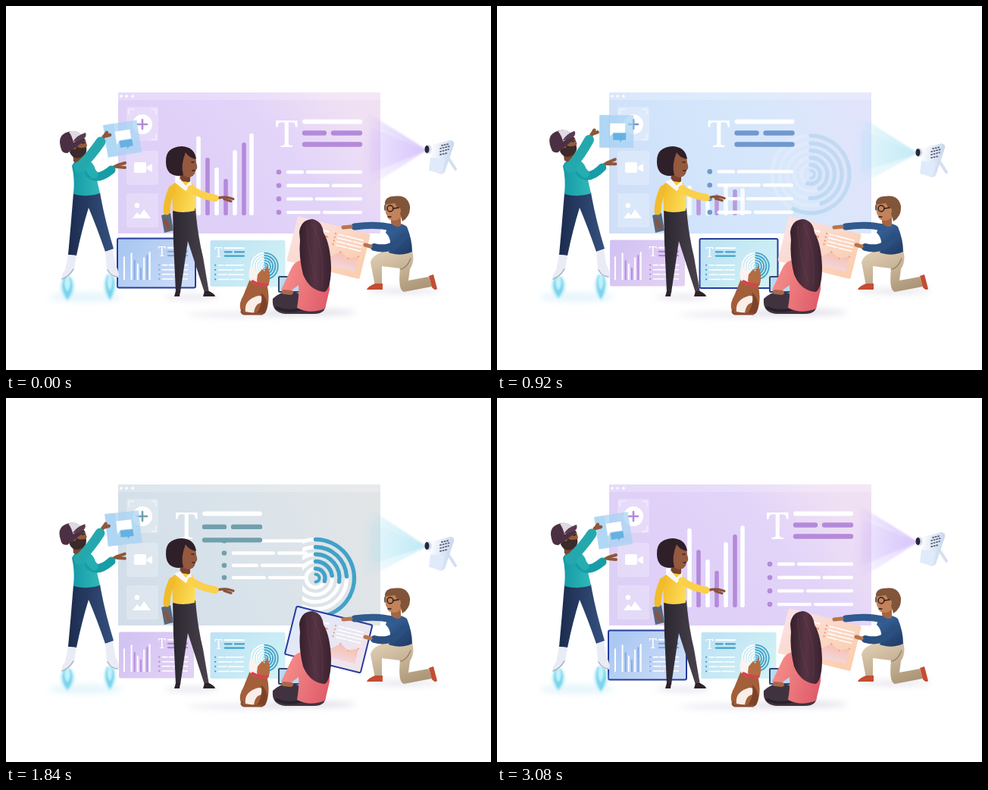
An HTML page that plays this animation: 640 px wide and 480 px high, repeating every 3.12 s.

```html
<!DOCTYPE html>
<html lang="en">
<head>
<meta charset="utf-8">
<title>Presentation team</title>
<style>
html, body { margin: 0; width: 100%; height: 100%; overflow: hidden; background: #fff; }
svg { display: block; width: 100vw; height: 100vh; }
text { font-family: "Noto Serif", "Liberation Serif", serif; font-size: 50px; }
</style>
</head>
<body>
<svg id="stage" viewBox="0 0 640 480"></svg>
<script>
const LOOP = 3120;
const SCENES = {
  bars:  { tx: 356, gapY: 15, dx: 360, y0: 219, row: 17.7, accent: [180, 138, 218], beam: '#c3a8fa', spread: 45 },
  rings: { tx: 224, gapY: 15, dx: 225, y0: 218, row: 18, accent: [66, 162, 200], beam: '#b4cdfb', spread: 42 },
  area:  { tx: 224, gapY: 20.3, dx: 363, y0: 153, row: 14, accent: [245, 154, 98], beam: '#ffc9a2', spread: 30 }
};
const MOVES = [
  { from: 'bars', to: 'rings', start: 720, span: 360 },
  { from: 'rings', to: 'area', start: 1670, span: 360 },
  { from: 'area', to: 'bars', start: 2640, span: 360 }
];
const BARS = [[226, 186, 181], [254, 172, 182], [266, 200, 220], [278, 213, 210],
  [290, 228, 207], [302, 190, 179], [314, 180, 194], [324, 168, 191]];
const PEAKS = [[295, 260], [329, 240], [364, 245], [398, 216], [433, 234], [469, 217]];
// Card looks: plain fill, lit fill, plain accent, lit accent.
const CARDS = {
  bars: ['purpleCard', 'blueCard', '#b48ada', '#86a8e4'],
  rings: ['cyanCard', 'cyanCard', '#42a2c8', '#42a2c8'],
  area: ['peachCard', 'paleCard', '#f59a62', '#f0a27c']
};

const clamp = v => Math.max(0, Math.min(1, v));
const lerp = (a, b, k) => a + (b - a) * k;
const ease = k => (1 - Math.cos(Math.PI * clamp(k))) / 2;
const wave = (t, period) => (1 - Math.cos(2 * Math.PI * t / period)) / 2;
const rgb = c => `rgb(${c.map(Math.round)})`;
const shape = (d, fill, extra = '') => `<path d="${d}" fill="${fill}" ${extra}/>`;
const line = (d, color, width, extra = '') =>
  `<path d="${d}" fill="none" stroke="${color}" stroke-width="${width}" stroke-linecap="round" stroke-linejoin="round" ${extra}/>`;
const oval = (x, y, rx, ry, fill, extra = '') =>
  `<ellipse cx="${x}" cy="${y}" rx="${rx}" ry="${ry}" fill="${fill}" ${extra}/>`;
const box = (x, y, w, h, fill, extra = '') =>
  `<rect x="${x}" y="${y}" width="${w}" height="${h}" fill="${fill}" ${extra}/>`;
const group = (body, extra) => `<g ${extra}>${body}</g>`;
const grad = (id, angle, ...colors) =>
  `<linearGradient id="${id}" gradientTransform="rotate(${angle} .5 .5)">` +
  colors.map((c, i) => `<stop offset="${i / (colors.length - 1)}" stop-color="${c}"/>`).join('') +
  '</linearGradient>';

function blend(a, b, p) {
  const out = {}, tint = ease((p - .25) / .6);
  for (const key of ['tx', 'gapY', 'dx', 'y0', 'row']) out[key] = lerp(a[key], b[key], p);
  out.accent = a.accent.map((c, i) => lerp(c, b.accent[i], tint));
  return out;
}

function copy(l, color) {
  const x = l.tx + 38, y = 152.5;
  let s = '';
  [24, 58, 36, 46].forEach((cut, i) => {
    const ry = l.y0 + i * l.row;
    s += oval(l.dx, ry, 3.3, 3.3, color);
    s += line(`M${l.dx + 12} ${ry}H${l.dx + cut + 7}M${l.dx + cut + 14} ${ry}H${l.dx + 108}`, '#fff', 4.4);
  });
  s += `<text x="${l.tx - 1}" y="186" fill="#fff">T</text>`;
  s += line(`M${x} ${y}h73`, '#fff', 6);
  return s + line(`M${x} ${y + l.gapY}h26M${x + 38} ${y + l.gapY}h35M${x} ${y + 2 * l.gapY}h73`, color, 6.4);
}

function bars(color, u, grow) {
  return BARS.map(([x, a, b], i) => {
    const h = (276 - lerp(a, b, u)) * grow;
    const fill = i && i % 2 === 0 ? color : '#fff';
    return box(x - 2.8, 276 - h, 5.6, h, fill, 'rx="2.6"');
  }).join('');
}

function rings(color, p = 0) {
  let s = '';
  [[51, 207], [41, 160], [31.5, 182], [22, 150], [12.5, 200]].forEach(([r, full], i) => {
    const sweep = i ? full * (1 - p) : full, a = sweep * Math.PI / 180;
    s += `<circle cx="414" cy="222" r="${r}" fill="none" stroke="#fff" stroke-width="5"/>`;
    s += line(`M414 ${222 - r}A${r} ${r} 0 ${+(sweep > 180)} 1 ${414 + r * Math.sin(a)} ${222 - r * Math.cos(a)}`, color, 5.4);
  });
  s += line('M414 217a5 5 0 0 1 0 10', color, 4);
  if (!p) return s;
  return `<clipPath id="ringCut"><rect x="${360 + 80 * p}" y="160" width="200" height="140"/></clipPath>` +
    group(s, `transform="translate(${-12 * p} ${34 * p})" clip-path="url(#ringCut)"`);
}

function area(color, p = 0) {
  const top = PEAKS.map(q => q.join(' ')).join('L');
  const body = shape(`M255 276L262 268L${top}V276Z`, 'url(#areaFill)') +
    line(`M262 268L${top}`, '#f6bba0', 1, 'opacity=".6"');
  const drift = Math.min(1, p * 4);
  const dots = PEAKS.map(([x, y]) =>
    oval(x - drift * (11 + (x - 295) * .1), y + drift * (5 + (x - 295) * .085), 3, 3, color)).join('');
  if (!p) return body + dots;
  return `<clipPath id="areaCut"><rect x="${255 + 230 * p}" y="200" width="${Math.max(0, 216 - 410 * p)}" height="90"/></clipPath>` +
    group(body, `clip-path="url(#areaCut)" opacity="${1 - p}"`) + group(dots, `opacity="${1 - p}"`);
}

function chart(name, color, u, leave, enter) {
  const grow = clamp(enter * 2 - 1);
  const body = name === 'bars' ? bars(color, u, (1 - leave) * grow)
    : name === 'rings' ? rings(color, leave) : area(color, leave);
  return group(body, `opacity="${clamp((1 - leave) * 2) * grow}"`);
}

function thumb(name, place) {
  const mini = copy(SCENES[name], 'currentColor') + chart(name, 'currentColor', 0, 0, 1);
  return group(box(0, 0, 99, 61, `url(#${CARDS[name][0]})`, 'rx="2"') +
    box(-2, -2, 103, 65, `url(#${CARDS[name][1]})`, `rx="2" stroke="#263c9e" id="${name}Lit"`) +
    group(mini, `transform="scale(.345) translate(-206 -123)" id="${name}Mini"`), `transform="${place}"`);
}

function sidebar(color) {
  let s = '';
  for (const y of [133, 191, 247]) s += box(159, y, 42, 45, '#fff', 'opacity=".24" rx="2"');
  s += line('M162 143v-7h7M192 136h6v7M198 169v7h-6M169 176h-7v-7', '#fff', 1, 'opacity=".8"');
  s += oval(180, 156, 13, 13, '#fff') + line('M174 156h12M180 150v12', color, 2.6);
  s += box(169, 206, 16, 14, '#fff', 'rx="2"') + shape('M186 212l7-4v11l-7-4z', '#fff');
  s += oval(173, 263, 3.3, 3.3, '#fff') + shape('M167 280l6-8 4 4 5-8 9 12z', '#fff');
  return s;
}

function screen(move, p, u, lit) {
  const l = blend(SCENES[move.from], SCENES[move.to], p), color = rgb(l.accent);
  const pane = (fill, o) => box(148, 114, 346, 186, fill, `opacity="${o}"`);
  let s = pane(`url(#${move.from}Bg)`, 1) + pane(`url(#${move.to}Bg)`, lit);
  if (move.from === 'rings') s += pane('url(#mistBg)', .9 * Math.sin(Math.PI * p));
  s += box(148, 114, 346, 10, '#fff', 'opacity=".2"');
  for (const x of [152, 159, 167]) s += oval(x, 119, 1.8, 1.8, '#fff');
  s += sidebar(color);
  if (p < 1) s += chart(move.from, rgb(SCENES[move.from].accent), u, p, 1);
  if (p > .5) s += chart(move.to, rgb(SCENES[move.to].accent), u, 0, p);
  return s + copy(l, color);
}

function beam(move, p, lift) {
  const mid = Math.sqrt(Math.sin(Math.PI * clamp(p)));
  const { beam: color, spread } = SCENES[p < .5 ? move.from : move.to];
  const y = 190 + lift;
  const fan = (id, c, half, o) => {
    const ray = (x, a, b, k) => shape(`M556 ${y}L${x} ${190 + a}V${190 + b}Z`, `url(#${id})`, `opacity="${k}"`);
    return `<radialGradient id="${id}" gradientUnits="userSpaceOnUse" cx="556" cy="${y}" r="92">` +
      `<stop offset="0" stop-color="${c}"/><stop offset=".7" stop-color="${c}" stop-opacity=".45"/>` +
      `<stop offset="1" stop-color="${c}" stop-opacity="0"/></radialGradient>` +
      group(ray(470, -half * 1.2, half * 1.2, .45) + ray(480, -half * .7, half * .7, .4) +
        ray(466, -half * 1.25, -half * .9, .3), `opacity="${o}" filter="url(#soft)"`);
  };
  return fan('rayA', color, spread, 1 - mid) + fan('rayB', '#a3e0f2', 42, mid);
}

function flames(t) {
  const turn = 2 * Math.PI * t / LOOP;
  return [[81, 357, 0], [137, 354, 2]].map(([x, y, k]) => {
    const h = 30 + 3 * Math.sin(turn * 13 + k), w = 8.5 + Math.cos(turn * 17 + k);
    const drop = (a, b, c, o) => shape(`M${x - a * .5} ${y}C${x - a * 1.5} ${y + b * .45} ${x - a * .6} ${y + b * .8} ${x} ${y + b}C${x + a * .7} ${y + b * .8} ${x + a * 1.5} ${y + b * .4} ${x + a * .5} ${y}Z`, c, `opacity="${o}"`);
    return group(drop(w + 1, h + 3, '#a5e8f6', .45) + drop(w * .75, h, '#55c6e6', .7) + drop(w * .4, h * .65, '#c9f6ff', .9), 'filter="url(#soft)"');
  }).join('');
}

const defs = `<defs>
${grad('barsBg', -25, '#ddd0f6', '#e0d0f8', '#e2d4f9', '#f0e0f4')}
${grad('ringsBg', -12, '#cfdff8', '#d2e5fb', '#d8e7fb', '#e1e4fb')}
${grad('areaBg', -12, '#dfd2f6', '#e8daf7', '#f2dfef', '#fbe3dd')}
${grad('mistBg', -12, '#d0dfe8', '#d7e4e9', '#dfe5e8')}
${grad('areaFill', 90, '#f6c0b0', '#f3d5da')}
${grad('purpleCard', 25, '#d3c3f3', '#e3d1f4')}
${grad('blueCard', 25, '#abc8f2', '#ccdcf7')}
${grad('cyanCard', 25, '#bfe3f5', '#cff1f5')}
${grad('peachCard', 25, '#fbe0e0', '#fbcfb0')}
${grad('paleCard', 25, '#dfe9fb', '#f0e4ec')}
${grad('teal', 0, '#159aa6', '#31b9b8')}
${grad('jeans', 0, '#1c2b4d', '#35517f')}
${grad('yellow', 20, '#f2bd2c', '#fddc58')}
${grad('slacks', 0, '#2b2731', '#4a434d')}
${grad('pink', 20, '#f58e89', '#e05e6c')}
${grad('hair', 0, '#35202c', '#563342', '#3a2230')}
${grad('navy', 60, '#37639a', '#223f6b')}
${grad('beige', 60, '#dccab0', '#ad9778')}
${grad('shell', 10, '#ffffff', '#c3d3ec')}
<filter id="soft" x="-50%" y="-20%" width="200%" height="140%"><feGaussianBlur stdDeviation="1.1"/></filter>
<filter id="haze" x="-30%" y="-100%" width="160%" height="300%"><feGaussianBlur stdDeviation="4"/></filter>
</defs>`;

const ground = group(
  oval(105, 384, 50, 6, '#d3eefa', 'opacity=".6"') + oval(315, 407, 75, 3, '#dcdce9', 'opacity=".7"') +
  oval(245, 384, 36, 3, '#d6d6e4', 'opacity=".7"') + oval(400, 404, 62, 4, '#d6d4e2', 'opacity=".8"') +
  oval(525, 376, 48, 3, '#dbd8e3', 'opacity=".8"'), 'filter="url(#haze)"');

const pilotHead =
  shape('M88 190L103 188L104 204Q96 211 89 205Z', '#79472f') +
  shape('M86 177Q99 168 105 177L107 184L103 193Q94 200 87 191Z', '#925a3d') +
  shape('M86 186Q91 188 93 184Q96 189 106 186Q108 195 100 199Q89 204 84 193Z', '#3b2a2a') +
  oval(90, 185, 3, 4, '#925a3d') + line('M101 181l3-1', '#2b1b1b', 1.4) +
  shape('M73 189Q67 172 79 167Q93 161 101 172L105 177L81 194Q74 194 73 189Z', '#4b3043') +
  shape('M83 166Q95 161 101 173L89 180Q87 171 83 166Z', '#dfd9e2') +
  shape('M88 179Q94 170 105 167Q108 174 98 177Z', '#5a3c4f');

const pilotBody =
  shape('M89 246H124Q130 281 142 320L131 324Q120 292 109 266Q100 295 93 329L82 328Q86 285 89 246Z', 'url(#jeans)') +
  shape('M82 328L93 329L90 346Q83 358 75 360Q71 357 78 348Z', '#e9ecf4') + line('M74 360Q83 357 89 347', '#aab3c8', 1.5) +
  shape('M131 324L141 321L144 340Q151 354 148 358Q139 359 133 348Z', '#e9ecf4') + line('M134 348Q139 357 147 357', '#aab3c8', 1.5) +
  shape('M87 211Q90 201 105 202Q119 206 119 225L124 247Q108 253 89 248Q91 228 87 211Z', 'url(#teal)');

const upperArm = line('M128 174L133 167M129 172L137 170', '#8f573b', 4.6) +
  line('M98 211Q112 198 125 179', '#25a8ad', 13, 'stroke-linecap="butt"') + oval(97, 212, 7.5, 7.5, '#25a8ad');
const lowerArm = line('M139 214L147 210L157 207M146 212L157 213', '#8f573b', 4) +
  line('M109 220Q120 232 139 216', '#179da7', 11) + line('M107 211L116 222', '#25aeb1', 11);

const presenter =
  shape('M220 267H250Q253 303 260 331L268 378H262L240 310L230 378H224L221 312Z', 'url(#slacks)') +
  shape('M224 376H230L229 383H222ZM262 376L268 376Q276 380 276 383H260Z', '#2d2228') +
  shape('M230 222H243V237Q236 247 229 235Z', '#78432e') +
  shape('M219 236Q226 230 232 231L246 233Q251 246 249 270Q232 274 220 270Z', 'url(#yellow)') +
  shape('M222 232L230 228L237 237L244 230L245 237L237 244Z', '#f9f7f5') +
  group(line('M279 253Q288 251 293 252L300 254M288 254L297 257', '#8c523a', 3.2) +
    line('M244 241Q257 250 276 253', '#fbd04a', 9.5), 'id="arm"') +
  line('M212 269L212 290', '#8c523a', 5) + shape('M205 276L217 273L221 296L209 299Z', '#58677c') +
  line('M210 283L215 293', '#8c523a', 4.4) +
  line('M219 241Q212 257 212 271', '#f1bc2c', 9) +
  shape('M230 193Q250 188 251 207Q254 214 250 217Q249 226 239 226Q228 222 228 208Z', '#94593e') +
  shape('M211 206Q210 186 232 185Q249 186 251 202Q241 200 237 193Q230 210 234 223Q224 226 216 220Q211 215 211 206Z', '#2e1f28') +
  line('M245 206h3M246 217h3', '#3a2023', 1.4);

const dog =
  shape('M322 360Q334 355 344 366Q350 390 342 405L314 407Q304 398 313 382Z', '#a35f3a') +
  shape('M323 342L331 350L341 352Q339 369 328 367Q316 362 323 342Z', '#faf3ef') +
  shape('M332 354L338 347L341 350L345 342Q351 357 346 369Q335 372 331 362Z', '#b46c43') +
  shape('M325 361Q337 367 347 365L346 369Q335 372 322 364Z', '#d64351') +
  shape('M316 403Q314 387 333 382Q344 383 340 391Q329 390 327 405Z', '#f8ede7') +
  shape('M337 378Q350 391 341 406L330 406Q339 396 337 378Z', '#7e4228') +
  line('M312 401Q309 404 314 406H338', '#8b4e30', 3);

const sitter =
  box(359, 356, 34, 22, '#36466f', 'rx="2"') + box(361, 358, 30, 18, '#b8daf3') +
  shape('M352 386Q366 372 387 379L421 389Q425 406 406 406H368Q350 404 352 386Z', '#40333f') +
  line('M357 398Q374 406 398 397', '#29222e', 4) +
  shape('M376 347Q382 333 398 335H417Q428 344 427 374L421 399Q401 407 384 398Q387 382 386 368L371 379L363 374Z', 'url(#pink)') +
  line('M367 377L376 378', '#a9674b', 6) +
  shape('M387 298Q389 282 404 281Q417 283 419 299Q428 314 429 344Q429 371 421 377Q401 376 392 354Q386 330 388 309Z', 'url(#hair)') +
  line('M405 288Q422 325 417 370M397 290Q399 333 411 365', '#6b4354', 1, 'opacity=".5"');

const kneeler =
  shape('M506 321L536 322Q540 336 533 347L531 362L558 357L562 370L525 377Q517 375 520 346L496 343L496 369H487L481 338Q483 327 506 321Z', 'url(#beige)') +
  line('M534 333Q528 347 520 347', '#917b60', 1.2) +
  shape('M487 366H497V374H476Q477 370 487 366ZM558 356L564 354L569 373Q566 376 562 371Z', '#c44d32') +
  shape('M504 289Q519 283 529 291Q536 308 536 324Q520 331 505 325Q511 308 501 299Z', 'url(#navy)') +
  line('M524 304Q510 324 486 318', '#2b4f7f', 10) + line('M481 317L474 315', '#b8754f', 5) +
  line('M510 292Q488 287 460 291', '#315a8e', 9) + line('M455 291L445 292', '#b8754f', 5) +
  shape('M508 277H521V290Q514 293 508 286Z', '#a56544') +
  shape('M500 260Q508 251 520 256L524 275Q516 287 505 281L501 273Z', '#c38259') +
  shape('M500 262Q499 252 511 251Q530 248 533 264Q534 277 523 284L519 270L513 260Z', '#81553a') +
  oval(518, 270, 3, 4, '#c38259') +
  '<circle cx="507" cy="267" r="4" fill="none" stroke="#2a2020" stroke-width="1.5"/>' +
  line('M511 267L518 266M500 263v6M504 278h4', '#2a2020', 1.3);

const projector =
  line('M584 201L593 215', '#d3dff2', 4) +
  shape('M559 184L586 177Q592 177 591 183L579 219Q576 223 571 221L558 217Q562 201 559 184Z', 'url(#shell)') +
  shape('M560 200L579 202L575 220L558 217Z', '#dfeafb') +
  line('M575 184l9-2M573 188l12-3M573 192l11-3M573 196l9-2', '#5d6478', 1.8, 'stroke-dasharray="1.2 2.4"') +
  oval(557, 189, 4.6, 6, '#d5dcec') + oval(555.5, 189, 3, 5, '#262838');

const card = box(-22, -21, 45, 43, '#a5d3f3', 'opacity=".72"') +
  box(-22, -21, 14, 43, '#8fc5ee', 'opacity=".3"') +
  shape('M-8 -10H12V2H-3L-8 7Z', '#fff') + shape('M-4 3H13V12H8L5 15V12H-4Z', '#65b2e2');

const stage = document.getElementById('stage');
stage.innerHTML = defs + ground + '<g id="screen"></g><g id="beam"></g>' +
  thumb('bars', 'translate(149 308.5)') + thumb('rings', 'translate(269.5 309)') +
  thumb('area', 'translate(385 277) rotate(14)') +
  '<g id="flames"></g>' + presenter + kneeler + dog + sitter +
  group(projector, 'id="projector"') + pilotBody + group(pilotHead, 'id="head"') +
  group(lowerArm, 'id="lowerArm"') + group(card, 'id="card"') + group(upperArm, 'id="upperArm"');

const el = {};
for (const node of stage.querySelectorAll('[id]')) el[node.id] = node;
const place = (id, value) => el[id].setAttribute('transform', value);

function highlight(move, lit) {
  for (const name in CARDS) {
    const on = name === move.to ? lit : name === move.from ? 1 - lit : 0;
    el[name + 'Lit'].setAttribute('opacity', on);
    el[name + 'Lit'].setAttribute('stroke-width', 2 * on);
    el[name + 'Mini'].setAttribute('color', CARDS[name][on > .5 ? 3 : 2]);
  }
}

function draw(t) {
  const first = t < MOVES[0].start;
  const move = MOVES.filter(m => t >= m.start).pop() || MOVES[2];
  const p = first ? 1 : ease((t - move.start) / move.span);
  const lit = first ? 1 : clamp((t - move.start - 30) / 140);
  const u = wave(t, LOOP / 2), lift = 6.5 * wave(t, LOOP);
  el.screen.innerHTML = screen(move, p, u, lit);
  el.beam.innerHTML = beam(move, p, lift);
  el.flames.innerHTML = flames(t);
  highlight(move, lit);
  place('projector', `translate(0 ${lift})`);
  place('head', `rotate(${-4 * u} 96 206) translate(0 ${-2 * u})`);
  place('upperArm', `rotate(${-6 * u} 98 214)`);
  place('lowerArm', `rotate(${-6 * u} 108 217)`);
  place('card', `translate(${lerp(153, 157.5, u)} ${lerp(174.5, 164, u)}) rotate(${lerp(-9, 1, u)})`);
  place('arm', `rotate(${lerp(.6, -.6, u)} 244 241)`);
}

const begin = performance.now();
function tick() {
  const t = (performance.now() - begin) % LOOP;
  draw(Math.floor(t / 40) * 40);
  requestAnimationFrame(tick);
}
draw(0);
requestAnimationFrame(tick);
</script>
</body>
</html>
```
